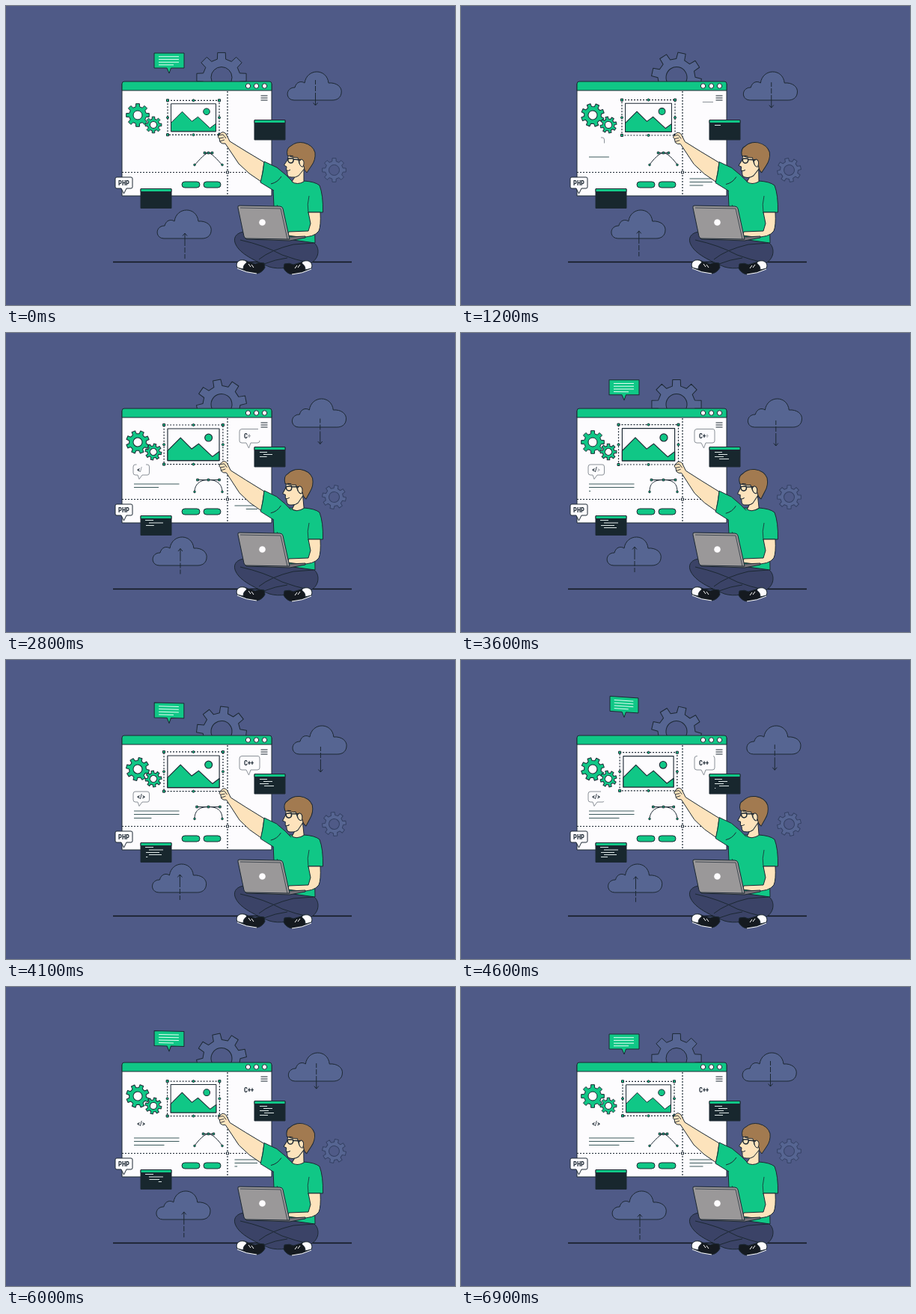
An HTML page for the animation above (7 s loop, 600x400 px).

```html
<!DOCTYPE html>
<html lang="en">
<head>
<meta charset="utf-8">
<style>
html, body { margin: 0; width: 100%; height: 100%; overflow: hidden; background: #4f5a87; }
svg { display: block; width: 600px; height: 400px; stroke: #1c2833; fill: none; stroke-linejoin: round; }
text { font: 700 8.5px "Roboto Condensed", "Open Sans Condensed", "Liberation Sans Narrow", Roboto, sans-serif; fill: #1c2833; stroke: none; text-anchor: middle; }
.green { fill: #10c786; }
.white { fill: #fdfcfe; }
.blue { fill: #566592; }
.hole { fill: #4f5a87; }
.dark { fill: #18272e; }
.skin { fill: #fde3bc; }
.navy { fill: #3b4367; }
.dots { stroke-dasharray: 2 2; stroke-width: 1.2; }
.plain { stroke: none; }
</style>
</head>
<body>
<svg viewBox="0 0 600 400">
  <defs>
    <path id="cloud" class="blue" d="M385 126C373 126 373 109 386 109C388 101 395 100 399 103C402 83 429 83 431 103C441 102 450 108 448 117C447 123 442 126 436 126Z"/>
    <g id="arrow"><path d="M0 0V34" stroke-dasharray="17 2 7 2"/><path d="M-3 3.5L0 0L3 3.5"/></g>
    <g id="shoe">
      <path fill="#151a20" d="M310 343C312 339 319 339 323 342L333 345Q338 342 345 344L346 350Q342 357 335 358Q320 356 309 350Z"/>
      <path class="white" d="M309 350Q306 343 313 340Q320 339 322 343Q317 346 317 352Z"/>
      <path stroke="#fff" d="M309 351Q321 357 335 358M324 345l3 4M328 346l3 4"/>
    </g>
  </defs>

  <path d="M143 342.5H462" stroke="#10151c" stroke-width="1.6"/>
  <g id="backGear" class="blue"></g>
  <g id="sideGear" class="blue" stroke="#344063"></g>
  <use href="#cloud" id="cloudR"/>
  <use href="#arrow" id="arrowR"/>
  <use href="#cloud" id="cloudL"/>
  <use href="#arrow" id="arrowL"/>

  <g id="bubble">
    <path class="green" d="M-20 -10H20V10H2.500L0 17L-3 10H-20Z"/>
    <path stroke="#e4fff4" d="M-14 -5.300H13M-14 -1.600H13M-14 2.200H13M-14 5.800H6"/>
  </g>

  <!-- browser window -->
  <path class="white" d="M155 104V254H355V104Z"/>
  <path class="green" d="M155 113V104Q155 101 158 101H352Q355 101 355 104V113Z"/>
  <g class="white"><circle cx="323.500" cy="107" r="3.200"/><circle cx="334.500" cy="107" r="3.200"/><circle cx="345.500" cy="107" r="3.200"/></g>
  <path d="M340.500 120H349.500M340.500 123H349.500M340.500 126H349.500"/>
  <path class="dots" d="M296 114V254M155 222.500H355"/>
  <rect class="white" x="294.500" y="221" width="3" height="3"/>
  <g class="green"><rect x="235" y="235" width="24" height="8" rx="4"/><rect x="264" y="235" width="23" height="8" rx="4"/></g>
  <g id="bigGear" class="green"></g>
  <g id="smallGear" class="green"></g>

  <g id="picture">
    <rect class="white" x="-30" y="-18.500" width="60" height="37"/>
    <path class="green" d="M-30 18.500V7L-15 -8L-2 5L6 -1L22 14L30 8V18.500Z"/>
    <circle class="green" cx="17.500" cy="-8" r="4.300"/>
  </g>
  <rect id="frame" class="dots"/>
  <g id="handles" class="green"></g>
  <path id="tangent"/>
  <path id="curve"/>
  <g id="knots" class="green"></g>

  <path id="cppBubble" pathLength="1" stroke="#8b9198" d="M337 128.500H315Q312 128.500 312 132V144Q312 147 315 147H321L324.500 154L327 147H336Q339 147 339 144V132Q339 128.500 337 128.500"/>
  <path id="tagBubble" pathLength="1" stroke="#8b9198" d="M187 176H189Q191.500 176 191.500 179V187Q191.500 190 189 190H182L178 195.500L176 190H173Q170 190 170 187V179Q170 176 173 176Z"/>
  <text id="cpp" x="324.500" y="141"></text>
  <text id="tag" x="180.500" y="186"></text>
  <path class="white" d="M148 229H167Q169 229 169 231V242Q169 244 167 244H161L157.500 251L154 244H148Q146 244 146 242V231Q146 229 148 229Z"/>
  <text x="157.500" y="240">PHP</text>

  <g class="dark"><rect x="332" y="153" width="41" height="26"/><rect x="180" y="245" width="41" height="25.500"/></g>
  <g class="green"><rect x="332" y="152.500" width="41" height="4"/><rect x="180" y="244.500" width="41" height="4"/></g>
  <g id="lines"></g>

  <!-- legs and shoes -->
  <path class="navy" d="M328 302C309 300 302 309 307 319C313 332 333 341 352 349Q362 352 375 350L402 346C418 342 421 325 412 317L378 303Z"/>
  <path d="M313 313Q345 320 369 333Q388 340 404 343M338 339Q354 326 384 319L411 317M345 345Q360 339 376 337"/>
  <use href="#shoe"/>
  <use href="#shoe" transform="matrix(-1 0 0 1 717 1)"/>

  <!-- torso -->
  <path class="green" d="M357 246Q360 233 382 234Q389 240 398 234Q413 235 419 240Q424 253 423.500 276H404Q414 297 413 317L376 312L358 268Z"/>
  <path d="M404 277Q402 265 405 254M362 266Q373 280 373 291" stroke-width=".8"/>
  <path class="skin" d="M404 276H420Q421 294 418 301Q412 310 392 309L376 307L378 302L404 301L407 291Z"/>

  <g id="head">
    <path class="skin" d="M387 227L382 235Q389 240 398 235V218Z"/>
    <path class="skin" d="M378 197L376 206L371.500 213L375 215L374.500 219L376 222Q375 229 381 229Q387 230 391 227L400 216V196Z"/>
    <path fill="#a27a50" d="M376 200Q374 190 381 187Q388 181 398 183Q410 186 413 196Q414 206 408 214L402 223Q398 220 398 214L392 211L390 203Q383 203 376 200Z"/>
    <path class="skin" d="M393 213Q390 206 395 205Q400 207 397 215Q395 216 393 213Z"/>
    <path d="M375 220Q378 221 380 219M379 200L384 201"/>
    <path stroke-width="1.500" d="M377 204H384Q385 210 380 210Q376 209 377 204M384 205L394 206"/>
  </g>

  <g id="arm">
    <path class="skin" d="M345 209L320 194L299 181L294 171Q290 167 287 170L284 173Q282 176 285 177L286 182Q289 185 293 184L311 211L325 224L341 235Z"/>
    <path d="M284 173L290 172L294 177M285 177L291 176M286 181L292 179" stroke-width=".9"/>
    <path class="green plain" d="M345 208L362 216L374 226L382 234L368 250L358 247L340 236Z"/>
    <path d="M382 234L374 226L362 216L345 208Q344 222 340 236L358 247M354 238Q363 236 368 228"/>
  </g>

  <!-- laptop -->
  <path fill="#77747a" d="M320 310L379 309L400 308V310L379 314L321 312Z"/>
  <path fill="#9a9899" d="M312 267L366 268Q369 268 370 271L379 312L321 311Q319 311 318 308L310 270Q309 267 312 267Z"/>
  <path d="M313 270L367 271L376 312" stroke-width=".7"/>
  <circle class="white plain" cx="342.500" cy="289.500" r="4.300"/>
</svg>
<script>
const LOOP = 7, STEP = 0.1;
const $ = id => document.getElementById(id);
const set = (el, attrs) => { for (const k in attrs) el.setAttribute(k, attrs[k]); };
const move = (id, transform) => set($(id), { transform });
const clamp = v => Math.min(1, Math.max(0, v));
const ramp = (t, from, to) => clamp((t - from) / (to - from));
const wave = u => (1 - Math.cos(2 * Math.PI * u)) / 2;

function add(parent, tag, attrs) {
  const el = document.createElementNS("http://www.w3.org/2000/svg", tag);
  set(el, attrs);
  return parent.appendChild(el);
}

function trim(el, from, to) {
  set(el, { "stroke-dasharray": `0 ${from} ${Math.max(0, to - from)} 2` });
}

function gear(id, outer, inner, hole, holeClass) {
  const points = [];
  for (let i = 0; i < 8; i++) {
    for (const [offset, r] of [[-13, inner], [-9, outer], [9, outer], [13, inner]]) {
      const a = (i * 45 + offset) * Math.PI / 180;
      points.push(`${(r * Math.sin(a)).toFixed(2)} ${(-r * Math.cos(a)).toFixed(2)}`);
    }
  }
  add($(id), "path", { d: `M${points.join("L")}Z` });
  add($(id), "circle", { r: hole, class: holeClass });
}
gear("backGear", 33.5, 25, 14, "hole");
gear("sideGear", 16, 12, 7, "hole");
gear("bigGear", 15.5, 11.5, 6, "white");
gear("smallGear", 11, 8, 4.5, "white");

const typed = [["cpp", "C++"], ["tag", "</>"]].flatMap(([id, word]) =>
  [...word].map((char, i) => {
    const el = add($(id), "tspan", {});
    el.textContent = char;
    return { el, start: 1.8 + i * 0.85 };
  }));

// x1, x2, y, draw start, draw end, erase start, second draw start
const INK = "#3c5a5c", CODE = "#dfe9e8";
const lines = [
  [INK, 171, 231.5, 202, 0.8, 1.7],
  [INK, 171, 231.5, 206.5, 2.2, 3.3],
  [INK, 171, 211.5, 211.5, 3.55, 4.5],
  [INK, 305.5, 336, 231, 0.3, 0.7, 2.9, 4.9],
  [INK, 305.5, 336, 235.5, 0.5, 0.9, 2.6, 5.4],
  [INK, 305.5, 323.5, 240, 0.8, 1.2, 2.3, 5.9],
  [CODE, 339, 349, 159.5, 0.8, 1.3],
  [CODE, 344, 356, 162.5, 1.6, 2.1],
  [CODE, 339, 351, 165.5, 2.4, 2.9],
  [CODE, 345, 358, 168.5, 3.1, 3.6],
  [CODE, 339, 350, 171.5, 4.55, 5],
  [CODE, 186, 197, 250.5, 1.3, 1.7, 6.5],
  [CODE, 191, 210, 254, 1.7, 2.2, 6.2],
  [CODE, 187, 205, 257.5, 2.5, 3, 5.9],
  [CODE, 191, 208, 260.5, 3, 3.5, 5.7],
  [CODE, 187, 196, 263.5, 4, 4.4, 5.4],
].map(([stroke, x1, x2, y, start, end, erase = 9, again = 9]) => ({
  el: add($("lines"), "path", { d: `M${x1} ${y}H${x2}`, stroke, pathLength: 1 }),
  start, end, erase, again,
}));

const handles = [];
for (const x of [-1, 0, 1]) for (const y of [-1, 0, 1]) {
  if (x || y) handles.push({ x, y, el: add($("handles"), "rect", { width: 3, height: 3, rx: x && y ? 0 : 1.5 }) });
}
const knots = Array.from({ length: 5 }, (_, i) =>
  add($("knots"), "rect", { width: 2.6, height: 2.6, rx: i > 2 ? 1.3 : 0 }));

function drawPicture(t) {
  const p = wave((ramp(t, 0.3, 3.5) + ramp(t, 3.5, 6.5)) / 2);
  const w = 34.5 + 5.5 * p, h = 23 + 3.7 * p, cx = 250.5, cy = 149.3;
  move("picture", `translate(${cx} ${cy}) scale(${1 + 0.17 * p})`);
  set($("frame"), { x: cx - w, y: cy - h, width: 2 * w, height: 2 * h });
  for (const { x, y, el } of handles) set(el, { x: cx + x * w - 1.5, y: cy + y * h - 1.5 });
}

function drawCurve(p) {
  const reach = 5 + 11 * p, rise = 213 - 9 * p;
  set($("tangent"), { d: `M${270.5 - reach} 196.500H${270.5 + reach}` });
  set($("curve"), { d: `M252 213C252 ${rise} ${270.5 - reach} 196.500 270.500 196.500S289 ${rise} 289 213` });
  [[270.5 - reach, 196.5], [270.5, 196.5], [270.5 + reach, 196.5], [252, 212.5], [289, 212.5]]
    .forEach(([x, y], i) => set(knots[i], { x: x - 1.3, y: y - 1.3 }));
}

function drawBubble(t) {
  const first = t < 3.5;
  const lift = wave(first ? ramp(t, 0.3, 3.5) : ramp(t, 3.5, 6.5));
  const turn = first ? 180 * (ramp(t, 0.3, 2.1) + ramp(t, 2.1, 3.5)) : 22 * lift;
  const a = turn * Math.PI / 180;
  const width = Math.cos(a) || 0.01;
  const slant = 0.2 * Math.sin(a);
  set($("bubble"), { transform: `matrix(${width} ${slant} 0 1 218 ${73 - 16 * lift})` });
}

function draw(t) {
  const u = ramp(t, 0.3, 6.9), p = wave(u);
  move("backGear", `translate(288 95.500) rotate(${90 * u})`);
  move("sideGear", `translate(438.500 219.500) rotate(${-90 * u})`);
  move("bigGear", `translate(176 146) rotate(${180 * u})`);
  move("smallGear", `translate(197 159) rotate(${-90 * u})`);
  move("cloudR", `translate(${7.3 * p} 0)`);
  move("arrowR", `translate(${413.5 + 7.3 * p} ${133 + 18 * p}) scale(1 -1)`);
  move("cloudL", `translate(${-174 - 7 * p} 185)`);
  move("arrowL", `translate(${239 - 7 * p} ${304 - 18 * p})`);
  move("head", `rotate(${-6 * p} 391 233)`);
  move("arm", `matrix(${1 - 0.03 * p} 0 0 1 ${10.4 * p} ${3.3 * p})`);
  drawPicture(t);
  drawCurve(p);
  drawBubble(t);

  for (const id of ["cppBubble", "tagBubble"]) trim($(id), ramp(t, 4.2, 6), ramp(t, 0.85, 3.2));
  for (const { el, start } of typed) set(el, { "fill-opacity": ramp(t, start, start + 0.3) });
  for (const { el, start, end, erase, again } of lines) {
    const fresh = t >= again;
    trim(el, fresh ? 0 : ramp(t, erase, erase + 0.4), fresh ? ramp(t, again, again + 0.5) : ramp(t, start, end));
  }
}

function tick(now) {
  draw(Math.floor(now / 1000 % LOOP / STEP + 1e-6) * STEP);
  requestAnimationFrame(tick);
}
draw(0);
requestAnimationFrame(tick);
</script>
</body>
</html>
```
